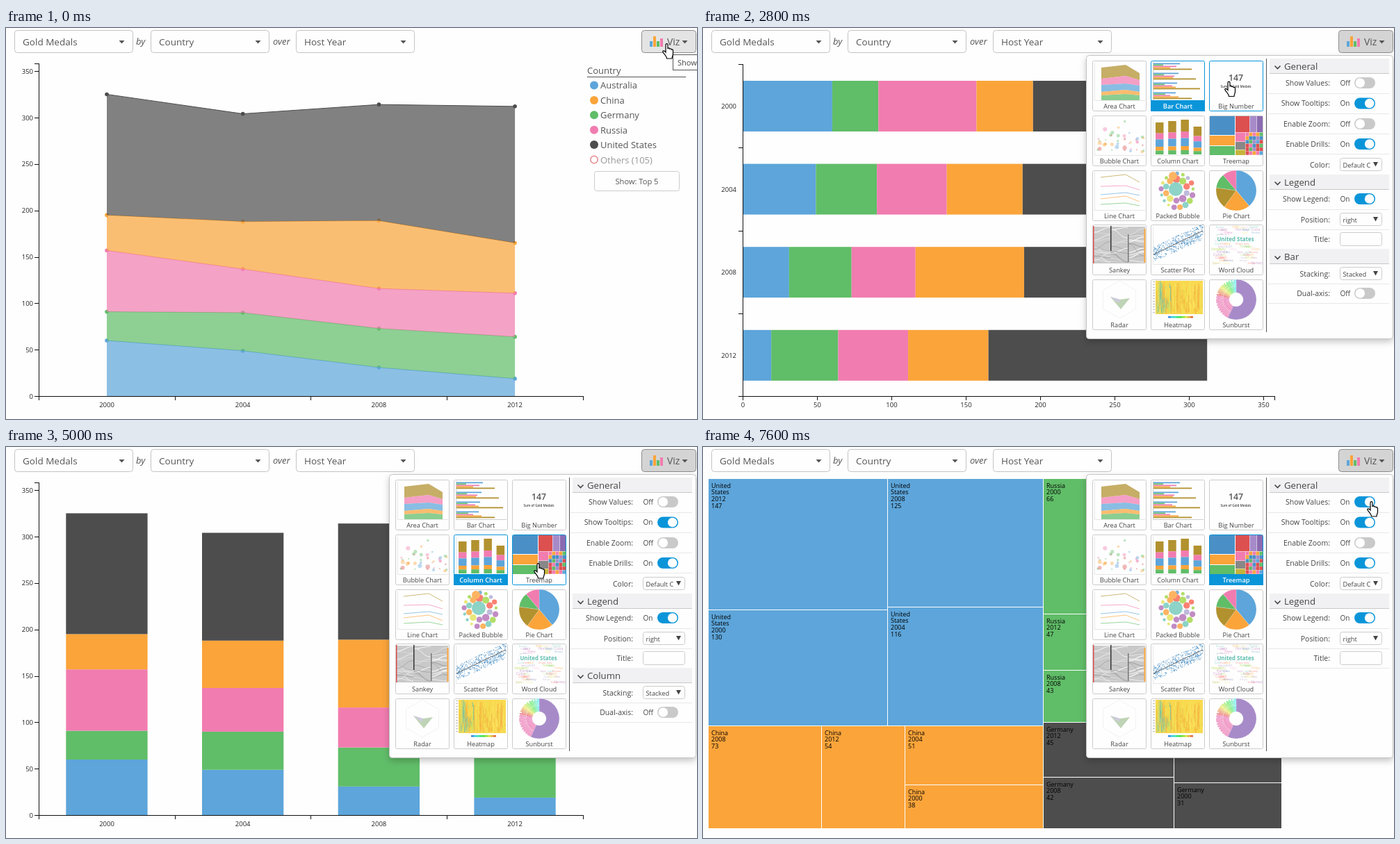
These frames come from a looping animation (994x563 px, 8 s). An HTML page:

```html
<!DOCTYPE html>
<html lang="en">
<head>
<meta charset="utf-8">
<title>Chart type picker</title>
<style>
  html, body { margin: 0; width: 100%; height: 100%; overflow: hidden; background: #fefefe; }
  svg { display: block; font-family: "Open Sans", "Noto Sans", sans-serif; }
</style>
</head>
<body>
<svg id="stage" width="994" height="563" viewBox="0 0 994 563"></svg>
<script>
const BLUE = '#5da5da', ORANGE = '#faa43a', GREEN = '#60bd68', PINK = '#f17cb0',
      DARK = '#4d4d4d', TAN = '#b2912f', PURPLE = '#a78bc9', RED = '#dd5050', ACCENT = '#0a95d9';
const YEARS = [2000, 2004, 2008, 2012];
// Stacking order, bottom to top
const SERIES = [
  ['Australia', BLUE, [60, 49, 31, 19]],
  ['Germany', GREEN, [31, 41, 42, 45]],
  ['Russia', PINK, [66, 47, 43, 47]],
  ['China', ORANGE, [38, 51, 73, 54]],
  ['United States', DARK, [130, 116, 125, 147]]
];
const BY_NAME = [0, 3, 1, 2, 4].map(i => SERIES[i]);
const VIZ = ['Area Chart', 'Bar Chart', 'Big Number', 'Bubble Chart', 'Column Chart', 'Treemap',
  'Line Chart', 'Packed Bubble', 'Pie Chart', 'Sankey', 'Scatter Plot', 'Word Cloud',
  'Radar', 'Heatmap', 'Sunburst'];
const AREA = 0, BAR = 1, BUBBLE = 3, COLUMN = 4, TREEMAP = 5;

let seed = 7;
const rnd = (a = 1, b = 0) => b + (a - b) * ((seed = (seed * 16807) % 2147483647) / 2147483647);
const pick = list => list[Math.floor(rnd(list.length))];
const range = n => [...Array(n).keys()];
const many = (n, fn) => range(n).map(fn).join('');
const clamp = v => Math.max(0, Math.min(1, v));
const ease = v => (v = clamp(v)) < .5 ? 4 * v ** 3 : 1 - 4 * (1 - v) ** 3;

const text = (x, y, s, size, fill = '#555', more = '') =>
  `<text x="${x}" y="${y}" font-size="${size}" fill="${fill}" ${more}>${s}</text>`;
const MID = 'text-anchor="middle"', END = 'text-anchor="end"';
const rect = (x, y, w, h, fill, more = '') =>
  `<rect x="${x}" y="${y}" width="${w}" height="${h}" fill="${fill}" ${more}/>`;
const box = (x, y, w, h, fill = '#fefefe', stroke = '#ccc', r = 3) =>
  rect(x + .5, y + .5, w, h, fill, `stroke="${stroke}" rx="${r}"`);
const circle = (x, y, r, fill, more = '') => `<circle cx="${x}" cy="${y}" r="${r}" fill="${fill}" ${more}/>`;
const path = (d, stroke, w = 1, fill = 'none', more = '') =>
  `<path d="${d}" stroke="${stroke}" stroke-width="${w}" fill="${fill}" ${more}/>`;
const shape = (pts, fill, more = '') => `<polygon points="${pts.join(' ')}" fill="${fill}" ${more}/>`;
const caret = (x, y) => shape([[x - 4, y - 2], [x + 4, y - 2], [x, y + 2.5]], '#555');

function wedge(cx, cy, r0, r1, a0, a1, fill) {
  const at = (r, a) => [cx + r * Math.sin(a * Math.PI / 180), cy - r * Math.cos(a * Math.PI / 180)];
  const big = a1 - a0 > 180 ? 1 : 0;
  return path(`M${at(r1, a0)}A${r1} ${r1} 0 ${big} 1 ${at(r1, a1)}L${at(r0, a1)}A${r0} ${r0} 0 ${big} 0 ${at(r0, a0)}Z`,
    '#fff', .2, fill);
}

// ---- Charts ----
const bandX = i => 145 + i * 195.7;
const axisPath = d => path(d, '#111', 1, 'none', 'shape-rendering="crispEdges"');
const label = (x, y, s, more) => text(x, y, s, 9.5, '#222', more);

function yearAxes(y, first) {
  const ticks = range(8).slice(first).map(i => i * 50);
  return axisPath('M41 51.5H47.5V530.5H41M47.5 536V530.5H830.5V536' +
      [243, 438, 634].map(x => `M${x}.5 530.5V536`).join('') +
      ticks.map(v => `M41 ${Math.round(y(v)) + .5}H47.5`).join('')) +
    ticks.map(v => label(39, y(v) + 3.6, v, END)).join('') +
    YEARS.map((v, i) => label(bandX(i), 546, v, MID)).join('');
}

// Calls fn(color, start, end, yearIndex) for each stacked value
function stacked(fn) {
  const base = [0, 0, 0, 0];
  return SERIES.map(([, color, values]) =>
    values.map((v, i) => fn(color, base[i], base[i] += v, i)).join('')).join('');
}

const valueY = v => 530.3 - v * 1.338;

function areaChart() {
  let low = [0, 0, 0, 0], out = '';
  for (const [, color, values] of SERIES) {
    const high = values.map((v, i) => v + low[i]);
    const pts = a => a.map((v, i) => [bandX(i), valueY(v)]);
    out += shape([...pts(high), ...pts(low).reverse()], color, 'opacity=".7"') +
      path('M' + pts(high).join('L'), color) +
      pts(high).map(([x, y]) => circle(x, y, 2.8, color)).join('');
    low = high;
  }
  return out + yearAxes(valueY, 0);
}

function barChart(p) {
  const x = v => 57.5 + v * 2.14, y = i => 112.5 + i * 119.6, ticks = range(8).map(i => i * 50);
  return stacked((c, a, b, i) => rect(x(a * p), y(i) - 36.5, (b - a) * 2.14 * p, 73, c)) +
    axisPath('M51 52.5H57.5V530.5H51M57.5 536V530.5H822.5V536' +
      [172, 292, 411].map(v => `M51 ${v}.5H57.5`).join('') +
      ticks.map(v => `M${Math.floor(x(v)) + .5} 530.5V536`).join('')) +
    ticks.map(v => label(x(v), 546, v, MID)).join('') +
    YEARS.map((v, i) => label(48, y(i) + 3.6, v, END)).join('');
}

function bubbleChart(p) {
  const y = v => 532.3 - v * 1.355;
  return BY_NAME.map(([, c, values]) => values.map((v, i) =>
    circle(bandX(i), y(v), 1.84 * Math.sqrt(v), c, `opacity="${p * .5}"`)).join('')).join('') + yearAxes(y, 1);
}

const columnChart = p =>
  stacked((c, a, b, i) => rect(bandX(i) - 58.7, valueY(b * p), 117.3, (b - a) * 1.338 * p, c)) + yearAxes(valueY, 0);

// [series, year index, x, y, right, bottom]
const TILES = [
  [4, 3, 8, 46, 265, 234], [4, 0, 8, 235, 265, 401], [4, 2, 266, 46, 489, 230], [4, 1, 266, 231, 489, 401],
  [3, 2, 8, 402, 170, 549], [3, 3, 171, 402, 290, 549], [3, 1, 291, 402, 489, 486], [3, 0, 291, 487, 489, 549],
  [2, 0, 490, 46, 677, 240], [2, 3, 490, 241, 677, 321], [2, 2, 490, 322, 677, 396],
  [1, 3, 490, 397, 677, 475], [1, 2, 490, 476, 677, 549], [1, 1, 678, 397, 832, 483], [1, 0, 678, 484, 832, 549]
];
const TILE_COLORS = [PINK, DARK, GREEN, ORANGE, BLUE];

const treemap = values => TILES.map(([s, i, x, y, r, b]) => {
  const [name, , nums] = SERIES[s];
  const lines = [...name.split(' '), YEARS[i], ...(values ? [nums[i]] : [])];
  return rect(x, y, r - x, b - y, TILE_COLORS[s]) +
    lines.map((s, n) => text(x + 4, y + 12.8 + n * 9.6, s, 9, '#000')).join('');
}).join('');

// ---- Legend and header ----
const legend = () =>
  text(836, 66, 'Country', 13) + rect(836, 70, 142, 1, '#555') +
  BY_NAME.map(([name, color], i) => circle(846, 82.5 + i * 21.4, 6, color) +
    text(855, 87 + i * 21.5, name, 13)).join('') +
  circle(846, 189.5, 5.2, '#fff', 'stroke="#e8878b" stroke-width="1.5"') +
  text(855, 194.5, 'Others (105)', 13, '#999') +
  box(846, 206, 122, 28) + text(907.5, 225, 'Show: Top 5', 11.1, '#555', MID);

const header = open =>
  [[12, 170, 'Gold Medals'], [208, 170, 'Country'], [417, 170, 'Host Year']].map(([x, w, s]) =>
    box(x, 3, w, 32, '#fefefe', '#c4c4c4', 4) + text(x + 12, 24.5, s, 13.5) + caret(x + 154.5, 20)).join('') +
  text(187, 24, 'by', 13, '#555', 'font-style="italic"') +
  text(384, 24, 'over', 13, '#555', 'font-style="italic"') +
  box(914, 3, 78, 32, open ? '#d4d4d4' : '#e4e4e4', '#8c8c8c', 4) +
  rect(926, 19, 4, 8, BLUE) + rect(931, 12, 4, 15, ORANGE) + rect(936, 19, 4, 8, GREEN) + rect(941, 15, 4, 12, PINK) +
  text(951, 24.5, 'Viz', 14) + caret(976.5, 20);

// ---- Thumbnails, in cell coordinates (78 x 73) ----
const FIVE = [TAN, PINK, BLUE, ORANGE, GREEN];
const PASTEL = ['#8dd3c7', '#e8e87a', '#bebada', '#fb8072', '#80b1d3', '#fdb462', '#b3de69', '#fccde5', '#c18bc4'];
const thumbAxes = path('M3.5 3V57.5H76', '#ddd', .7);

const thumbs = [
  () => {
    const ys = [[10, 6, 18], [26, 22, 28], [35, 33, 36], [45, 42, 45], [50, 48, 50], [57, 57, 57]];
    const row = r => ys[r].map((y, i) => [[13, 48, 68][i], y]);
    return thumbAxes + FIVE.map((c, r) => shape([...row(r), ...row(r + 1).reverse()], c, 'opacity=".72"')).join('');
  },
  () => path('M3.5 2V57.5H76', '#bbb', .7) + many(4, g => [BLUE, GREEN, PINK, ORANGE, TAN].map((c, i) =>
    rect(4, 3.5 + g * 14 + i * 2, [38 - g * 2, 14 + g, 33 - g * 3, 24 + g * 4, 55 + (g % 3) * 6][i], 1.8, c)).join('')),
  () => text(38.5, 29, 147, 12.3, '#555', MID + ' font-weight="600"') +
    text(38.5, 39, 'Sum of Gold Medals', 4.6, '#444', MID + ' font-weight="600"'),
  () => thumbAxes + many(40, i => circle(8 + (i % 8) * 9 + rnd(3), rnd(53, i % 3 ? 28 : 6), rnd(3.2, 1),
    pick([BLUE, GREEN, PINK, ORANGE, RED]), 'opacity=".4"')),
  () => thumbAxes + many(4, i => {
    const top = [10, 8, 6, 16][i], h = 56 - top;
    return FIVE.map((c, k) => rect(7 + i * 18.2, top + h * [0, .34, .53, .76, .88][k], 11.5,
      h * [.34, .19, .23, .12, .12][k], c)).join('');
  }),
  () => rect(1, 1, 36, 27, '#4a90c6') + rect(1, 29, 36, 14, ORANGE) + rect(1, 44, 36, 13, GREEN) +
    rect(38, 1, 20, 23, RED) + rect(58.5, 1, 10, 23, PURPLE) + rect(69, 1, 8, 23, '#8a6bb0') +
    rect(38, 24.5, 14, 13, PINK) + rect(38, 38, 14, 11, '#888') + rect(38, 49.5, 14, 7.5, '#c5b53c') +
    many(30, i => rect(52.5 + (i % 5) * 5, 24.5 + Math.floor(i / 5) * 5.4, 4.8, 5.2,
      pick([BLUE, GREEN, ORANGE, RED, PURPLE, PINK, '#4a90c6']))),
  () => thumbAxes + [[10, 6, 17], [23, 22, 28], [35, 32, 36], [41, 37, 45], [49, 47, 51]].map((y, i) =>
    path(`M12 ${y[0]}L48 ${y[1]}L68 ${y[2]}`, FIVE[i], .8, 'none', 'opacity=".8"')).join(''),
  // Two rings of bubbles around a big one
  () => many(17, i => circle(38 + 23 * Math.sin(i * .37), 29 - 24.5 * Math.cos(i * .37), rnd(4.6, 2), pick(PASTEL))) +
    many(10, i => circle(37 + 15.5 * Math.sin(i * .628), 28 - 15.5 * Math.cos(i * .628), rnd(5.6, 4), pick(PASTEL))) +
    circle(32, 8, 6, '#fdb462') + circle(36, 27, 10, '#8dd3c7'),
  () => [0, 140, 216, 278, 320].map((a, i, s) =>
    wedge(39, 29, 0, 29, a, s[i + 1] || 360, [BLUE, ORANGE, TAN, GREEN, PINK][i])).join(''),
  () => rect(2, 3, 74, 53, '#c9c9c9') + many(46, i => {
    const x = [2, 27, 51][i % 3], a = rnd(54, 5), b = clamp((a + rnd(24, -14)) / 54) * 50 + 4;
    return path(`M${x} ${a}C${x + 12} ${a} ${x + 12} ${b} ${x + 24} ${b}`,
      pick(['#f4f4f4', '#e2e2e2', '#aaa']), rnd(1.4, .4));
  }) + rect(1, 2, 1.5, 54, RED) + rect(26, 2, 1.5, 36, '#333') + rect(51, 14, 1.5, 40, '#777') +
    rect(74.5, 6, 2, 49, ORANGE),
  () => thumbAxes + many(420, () => {
    const x = rnd(75, 4);
    return rect(x.toFixed(1), (44 - x * .46 + rnd(11, -11)).toFixed(1), 1, 1, '#4a90c6');
  }) + path('M4 43L75 9', '#333', .7),
  () => many(70, i => text(rnd(62, 3).toFixed(1), (5 + (i % 14) * 4).toFixed(1),
    pick(['China', 'Italy', 'Norway', 'Japan', 'Spain', 'Cuba', 'Kenya']), rnd(5.5, 3).toFixed(1),
    pick(PASTEL), 'opacity=".75"')) + rect(12, 15, 53, 11, '#fefefe') +
    text(38, 23.7, 'United States', 7.9, '#5fbdb0', MID + ' font-weight="700"'),
  () => shape(range(6).map(i =>
    [39 + 27 * Math.sin(i * Math.PI / 3), 29 - 27 * Math.cos(i * Math.PI / 3)]), 'none', 'stroke="#f2f2f2"') +
    shape([[26, 25], [40, 29], [54, 27], [41, 43]], '#b4cba9', 'opacity=".85"') +
    shape([[26, 25], [40, 29], [38, 34]], '#cfcbdf'),
  () => rect(7, 2, 68, 48, '#f9d84e') + many(190, () => {
    const x = rnd(74, 7), y = rnd(44, 2);
    return rect(x, y, 1.2, rnd(50 - y, 3), pick(x < 30
      ? ['#a8d38a', '#dbe35c', '#6fc0a8', '#f6b53c'] : ['#f6c53c', '#fbe96a', '#f4b040', '#f0e45c']), 'opacity=".7"');
  }) + many(9, i => rect(25 + i * 4, 53, 4, 2.5, `hsl(${210 - i * 24} 75% 55%)`)) +
    many(12, i => rect(3, 3 + i * 4, 3, 1, '#bbb')),
  () => wedge(39, 29, 10, 29, 0, 205, PURPLE) + many(20, i => {
    const a = 205 + i * 7.75, c = i < 10 ? '#ee8fc0' : `hsl(${(i - 10) * 20} 75% 72%)`;
    return wedge(39, 29, 10, 19, a, a + 7.75, c) +
      wedge(39, 29, 19, 29, a, a + 4, c) + wedge(39, 29, 19, rnd(29, 26), a + 4, a + 7.75, c);
  })
].map(draw => draw());

const cellX = i => 560 + (i % 3) * 84, cellY = i => 47 + Math.floor(i / 3) * 78.8;

function cell(i, selected, hover) {
  const edge = selected || hover ? ACCENT : '#ccc';
  return `<g transform="translate(${cellX(i)} ${Math.round(cellY(i))})">` + box(0, 0, 77, 72, '#fefefe', edge, 2) +
    thumbs[i] + (selected ? rect(0, 57, 78, 16, ACCENT) : '') +
    text(39, 68.8, VIZ[i], 9.2, selected ? '#fff' : '#444', MID + (selected ? ' font-weight="600"' : '')) + '</g>';
}

// ---- Settings panel ----
const section = (y, s) => rect(815, y, 172, 21, '#f1f1f3') + rect(815, y + 21, 172, 1, '#c8c8c8') +
  path(`M822.5 ${y + 10.5}l4 4l4 -4`, '#444', 1.6) + text(836, y + 15.8, s, 13.2, '#444', 'font-weight="500"');
const row = (y, s) => text(902, y + 3.8, s, 10.5, '#444', END);
const rule = y => rect(812, y, 175, 1, '#e8e8e8');
const toggle = (y, s, on) => row(y, s) + text(916.5, y + 3.8, on ? 'On' : 'Off', 10, '#444') +
  rect(937, y - 8, 30, 16, on ? ACCENT : '#c9c9c9', 'rx="8"') + circle(on ? 958.7 : 945.3, y, 6.8, '#fff');
const select = (y, s, value) => row(y, s) + box(916, y - 10, 60, 18) + text(920.5, y + 3.6, value, 9.3, '#444') +
  shape([[964, y - 4], [971, y - 4], [967.5, y + 2.5]], '#444');

function panel(viz, hover, values) {
  const extra = { [AREA]: 'Area', [BAR]: 'Bar', [COLUMN]: 'Column' }[viz];
  return `<g filter="url(#shadow)">${box(551, 39, 441, 408, '#fefefe', '#c4c4c4', 4)}</g>` +
    VIZ.map((_, i) => cell(i, i === viz, i === hover)).join('') + rect(810, 44, 1, 394, '#555') +
    section(44, 'General') + toggle(79, 'Show Values:', values) + toggle(108.5, 'Show Tooltips:', true) +
    toggle(138, 'Enable Zoom:', false) + toggle(167, 'Enable Drills:', true) + select(197, 'Color:', 'Default C') +
    [94, 123, 152, 181, 261, 290, 318].map(rule).join('') +
    section(211, 'Legend') + toggle(246, 'Show Legend:', true) + select(276, 'Position:', 'right') +
    row(304, 'Title:') + box(916, 294, 60, 19) +
    (extra ? section(318, extra) + select(354, 'Stacking:', 'Stacked') + rule(368) +
      toggle(382, 'Dual-axis:', false) + rule(396) : '');
}

// ---- Pointer ----
const TRACK = [[0, 944, 22], [600, 944, 22], [1600, 678, 66], [2200, 678, 66], [2800, 750, 76.5], [3400, 589, 170.5],
  [3800, 589, 170.5], [4400, 675, 168], [4600, 675, 168], [5000, 759, 167], [5600, 759, 167],
  [6600, 962, 78], [7000, 955, 78], [8000, 955, 78]];

function pointer(t) {
  const i = TRACK.findIndex(k => k[0] > t), [t0, x0, y0] = TRACK[i - 1], [t1, x1, y1] = TRACK[i];
  const p = (t - t0) / (t1 - t0), e = p * p * (3 - 2 * p);
  return [x0 + (x1 - x0) * e, y0 + (y1 - y0) * e];
}

const hand = (x, y) => path('M5 13V2.2C5 .2 8 .2 8 2.2V8c0-1.6 2.8-1.6 2.8 0v.8c0-1.4 2.5-1.4 2.5.2v.8' +
  'c0-1.2 2.2-1.2 2.2.4V15c0 3-1.5 4-1.5 7H6.5C6.5 19 3 16 1 12.6C0 10.8 2.5 9.6 5 13z',
  '#000', 1.2, '#fff', `transform="translate(${x} ${y})"`);

// ---- Timeline ----
const DEFS = '<defs><filter id="shadow" x="-10%" y="-10%" width="120%" height="120%">' +
  '<feDropShadow dx="0" dy="4" stdDeviation="5" flood-opacity=".22"/></filter></defs>';

function scene(t) {
  const open = t >= 600, values = t >= 7200;
  const viz = t < 2000 ? AREA : t < 3400 ? BAR : t < 4400 ? BUBBLE : t < 5200 ? COLUMN : TREEMAP;
  const chart = {
    [AREA]: areaChart,
    [BAR]: () => barChart(ease((t - 2200) / 600)),
    [BUBBLE]: () => bubbleChart(ease((t - 3400) / 700)),
    [COLUMN]: () => columnChart(ease((t - 4400) / 600)),
    [TREEMAP]: () => treemap(values)
  }[viz]();
  const [x, y] = pointer(t);
  const hover = VIZ.findIndex((_, i) =>
    x + 6 >= cellX(i) && x + 6 < cellX(i) + 78 && y >= cellY(i) && y < cellY(i) + 73);
  const tip = box(959, 38, 60, 22, '#fff', '#555', 0) + text(966, 53.5, 'Show options', 11, '#444');
  return DEFS + chart + (open ? '' : legend()) + header(open) + (open ? panel(viz, hover, values) : tip) + hand(x, y);
}

const LOOP = 8000, STEP = 200, stage = document.getElementById('stage');
const start = performance.now();
let shown = -1;
function tick() {
  const t = Math.floor((performance.now() - start) % LOOP / STEP) * STEP;
  if (t !== shown) stage.innerHTML = scene(shown = t);
  requestAnimationFrame(tick);
}
tick();
</script>
</body>
</html>
```
